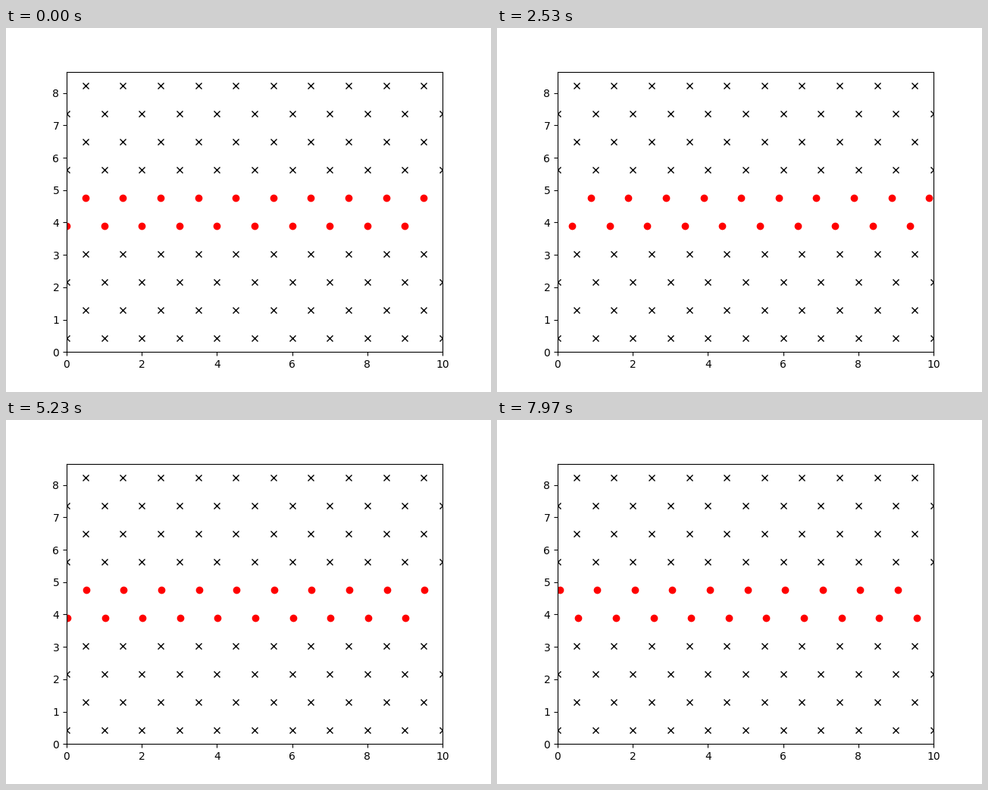
Animation of 640 by 480 pixels, one loop 8 s. Source, as a matplotlib script:

```python
import numpy as np
import matplotlib.pyplot as plt
from matplotlib.animation import FuncAnimation

FRAMES = 240
LOOP_MS = 8000
WIDTH, ROWS = 10, 10
ROW_GAP = np.sqrt(3) / 2
MOVING = (4, 5)
DRIVE, PINNING = 0.02, 0.005


def lattice_row(row):
    """Points of one row of the triangular lattice."""
    x = np.arange(WIDTH + 1) + 0.5 * (row % 2)
    return x, np.full(x.size, (row + 0.5) * ROW_GAP)


def glide_path():
    """Overdamped drift of the sliding rows over a periodic potential."""
    path = np.zeros(FRAMES)
    for i in range(1, FRAMES):
        x = path[i - 1]
        path[i] = x + DRIVE - PINNING * np.sin(2 * np.pi * x)
    return path


fig, ax = plt.subplots(figsize=(6.4, 4.8), dpi=100)
ax.set_xlim(0, WIDTH)
ax.set_ylim(0, ROWS * ROW_GAP)

for row in range(ROWS):
    if row not in MOVING:
        ax.plot(*lattice_row(row), "kx")

starts = [lattice_row(row) for row in MOVING]
x0 = np.concatenate([x[:WIDTH] for x, _ in starts])
y0 = np.concatenate([y[:WIDTH] for _, y in starts])
dots, = ax.plot(x0, y0, "ro")
path = glide_path()


def update(i):
    dots.set_xdata((x0 + path[i]) % WIDTH)
    return dots,


anim = FuncAnimation(fig, update, frames=FRAMES, interval=LOOP_MS / FRAMES,
                     repeat=True, repeat_delay=0)
plt.show()
```
